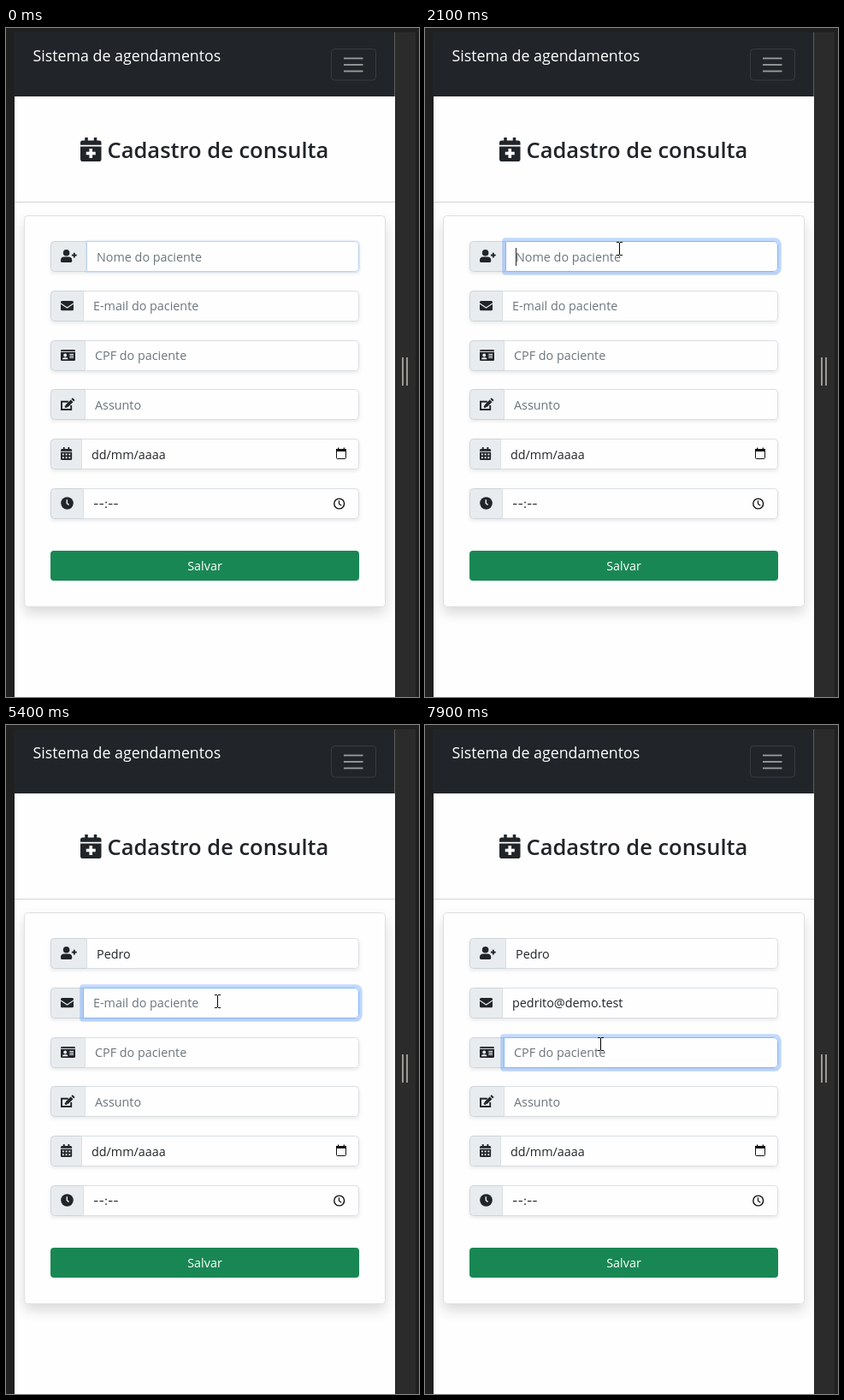
Animation, 483 px wide and 782 px high, one loop 8 s. Source, as an HTML page with a canvas:

```html
<!DOCTYPE html>
<html lang="pt-BR">
<head>
<meta charset="utf-8">
<title>Cadastro de consulta</title>
<style>
  html, body { margin: 0; width: 100%; height: 100%; overflow: hidden; background: #202020; }
  canvas { display: block; width: 483px; height: 782px; }
</style>
</head>
<body>
<canvas id="stage"></canvas>
<script>
const W = 483, H = 782, LOOP = 8000, STEP = 100;
const INK = '#212529', MUTED = '#6c757d', PAPER = '#fefefe', ADDON = '#e9ecef', DARK = '#111';
const FAMILY = '"Open Sans", "Noto Sans", sans-serif';
const FIELD_FONT = `14.35px ${FAMILY}`;
const LEFT = 52, RIGHT = 413, TOP = 249.6, PITCH = 57.75, ROW = 36;
const canvas = document.getElementById('stage');
const ctx = canvas.getContext('2d');
const dpr = window.devicePixelRatio || 1;
canvas.width = W * dpr;
canvas.height = H * dpr;

const FIELDS = [
  { icon: userIcon, split: 94, hint: 'Nome do paciente' },
  { icon: mailIcon, split: 90, hint: 'E-mail do paciente' },
  { icon: cardIcon, split: 92, hint: 'CPF do paciente' },
  { icon: editIcon, split: 92, hint: 'Assunto' },
  { icon: dateIcon, split: 88, value: 'dd/mm/aaaa' },
  { icon: timeIcon, split: 90, value: '--:--', font: '14px Inter, sans-serif' }
];
FIELDS.forEach((f, i) => {
  const y = TOP + i * PITCH;
  f.y = Math.floor(y);
  f.caret = Math.round(y + 7);
  f.base = f.caret + 16;
});

const NAME = 'Pedro', MAIL = 'pedrito@demo.test', MAIL_AT = 6000;
const KEYS = [2400, 3000, 3300, 3500, 3700];
// Each click focuses the next field.
const CLICKS = [{ at: 1080, hold: 300 }, { at: 4900, hold: 100 }, { at: 6950, hold: 100 }];
const INPUTS = [...CLICKS.map(c => c.at), ...KEYS, MAIL_AT];
const START = { x: 300, y: 688 };
const MOVES = [
  { from: 100, to: 600, x: 202, y: 224 },
  { from: 600, to: 850, x: 226, y: 259 },
  { from: 1700, to: 2100, x: 227, y: 258 },
  { from: 3900, to: 4000, x: 227, y: 253 },
  { from: 4100, to: 4700, x: 247, y: 323 },
  { from: 6200, to: 6700, x: 201, y: 384 },
  { from: 7200, to: 7500, x: 205, y: 373 }
];

const clamp = v => Math.max(0, Math.min(1, v));
const mix = (a, b, k) => a + (b - a) * k;
const easeOut = k => 1 - (1 - k) ** 3;

function box(x, y, w, h, r, fill, stroke) {
  ctx.beginPath();
  ctx.roundRect(x, y, w, h, r);
  if (fill) { ctx.fillStyle = fill; ctx.fill(); }
  if (stroke) { ctx.strokeStyle = stroke; ctx.lineWidth = 1; ctx.stroke(); }
}

function rect(x, y, w, h, fill) {
  ctx.fillStyle = fill;
  ctx.fillRect(x, y, w, h);
}

function disc(x, y, r, fill) {
  ctx.beginPath();
  ctx.arc(x, y, r, 0, Math.PI * 2);
  ctx.fillStyle = fill;
  ctx.fill();
}

function line(points, color, width) {
  ctx.beginPath();
  points.forEach(([x, y]) => ctx.lineTo(x, y));
  ctx.strokeStyle = color;
  ctx.lineWidth = width;
  ctx.stroke();
}

function text(s, x, y, font, fill, align = 'left') {
  ctx.font = font;
  ctx.fillStyle = fill;
  ctx.textAlign = align;
  ctx.fillText(s, x, y);
}

function shadow(y, blur, alpha) {
  ctx.shadowColor = `rgba(0,0,0,${alpha})`;
  ctx.shadowOffsetY = y * dpr;
  ctx.shadowBlur = blur * dpr;
}

function at(x, y, paint) {
  ctx.save();
  ctx.translate(x, y);
  paint();
  ctx.restore();
}

function cross(x, y, size, width, fill) {
  rect(x - size / 2, y - width / 2, size, width, fill);
  rect(x - width / 2, y - size / 2, width, size, fill);
}

// Icons are drawn from their top left corner, about 15 units tall.
function userIcon() {
  disc(6.6, 3.8, 3.8, INK);
  box(0, 8.5, 13.2, 6.5, [4, 4, 1.4, 1.4], INK);
  cross(15.8, 6.6, 5.8, 1.9, INK);
}

function mailIcon() {
  box(0, 2, 15, 11.2, 1.5, INK);
  line([[0, 5], [7.5, 10], [15, 5]], ADDON, 1.1);
}

function cardIcon() {
  box(0, 1, 17, 13.1, 1.4, INK);
  rect(0, 2.8, 17, 1, ADDON);
  disc(5.2, 7.5, 1.9, ADDON);
  box(1.9, 10.3, 6.5, 1.9, [1.9, 1.9, 0, 0], ADDON);
  for (let i = 0; i < 3; i++) rect(10.3, 5.9 + 1.9 * i, 4.7, 1.1, ADDON);
}

function editIcon() {
  line([[8.8, 4.7], [1, 4.7], [1, 14], [12.2, 14], [12.2, 9]], INK, 1.9);
  line([[13.1, 3.8], [7, 9.9]], INK, 3.8);
  line([[13.8, 3.1], [15.2, 1.7]], INK, 3.8);
  disc(6.2, 10.6, 1.5, INK);
}

function calendar(size) {
  const w = size * 7 / 8, r = size / 10, ring = size / 8;
  rect(ring * 1.5, 0, ring, size / 4, INK);
  rect(ring * 4.5, 0, ring, size / 4, INK);
  box(0, size / 8, w, size * 3 / 16, [r, r, 0, 0], INK);
  box(0, size * 3 / 8, w, size * 5 / 8, [0, 0, r, r], INK);
}

function dateIcon() {
  calendar(15);
  for (let i = 0; i < 6; i++) rect(1.9 + i % 3 * 3.75, 7.5 + (i > 2) * 3.75, 1.9, 1.9, ADDON);
}

function timeIcon() {
  disc(7.5, 7.5, 7.3, INK);
  line([[7.3, 3.3], [7.3, 7.7], [9.6, 9.5]], ADDON, 1.5);
}

function drawPage() {
  rect(0, 0, W, H, '#202020');
  rect(9, 5, 446, 75, INK);
  rect(454, 5, 1, 75, '#5c5c58');
  rect(455, 5, 24, H, '#2b2b2b');
  for (const x of [463, 468]) rect(x, 385, 2, 33, '#9d9893');
  rect(10, 80, 445, H, PAPER);
  text('Sistema de agendamentos', 31.5, 39, `17.8px ${FAMILY}`, '#fff');
  box(380.5, 24.5, 52, 36.5, 4, null, 'rgba(255,255,255,.1)');
  for (let i = 0; i < 3; i++) rect(395, 34.6 + 7.5 * i, 22.5, 1.8, 'rgba(255,255,255,.55)');
  at(87, 128, () => {
    calendar(28);
    cross(12.25, 18.5, 11, 3.6, PAPER);
  });
  text('Cadastro de consulta', 118.5, 152, `600 25.5px ${FAMILY}`, INK);
  rect(10, 203, 445, 1, '#d4d4d5');

  ctx.save();
  shadow(7.5, 15, .15);
  box(21.5, 219.5, 422, 457, 4, '#fff');
  ctx.restore();
  box(21.5, 219.5, 422, 457, 4, PAPER, '#dfdfdf');
  box(LEFT, 611, RIGHT - LEFT, 35, 4, '#198754');
  text('Salvar', 232.5, 633.5, FIELD_FONT, '#fff', 'center');
}

function drawField({ icon, split, y, base, hint, value, font }, typed, focus) {
  const radii = [0, 4, 4, 0], w = RIGHT - split;
  ctx.save();
  shadow(2, 4, .09);
  box(LEFT, y, RIGHT - LEFT, ROW, 4, '#fff');
  ctx.restore();
  box(LEFT + .5, y + .5, split - LEFT, ROW - 1, [4, 0, 0, 4], ADDON, '#ced4da');
  if (focus) {
    const s = 3.75 * focus;
    ctx.beginPath();
    ctx.roundRect(split - s, y - s, w + 2 * s, ROW + 2 * s, [s, 4 + s, 4 + s, s]);
    ctx.roundRect(split, y, w, ROW, radii);
    ctx.fillStyle = `rgba(13,110,253,${.25 * focus})`;
    ctx.fill('evenodd');
  }
  const border = `rgb(${mix(218, 134, focus)},${mix(223, 183, focus)},${mix(227, 254, focus)})`;
  box(split + .5, y + .5, w - 1, ROW - 1, radii, PAPER, border);
  at(64, y + 10, icon);
  const content = typed || value;
  text(content || hint, split + 12, base, font || FIELD_FONT, content ? INK : MUTED);
}

function drawPickers() {
  const [date, time] = FIELDS.slice(4);
  at(386, date.y + 11, () => {
    box(.5, 1.5, 11, 11, 1, null, DARK);
    rect(0, 1, 12, 3, DARK);
    for (const x of [2, 8.7]) rect(x, -.5, 1.3, 2, DARK);
  });
  at(389.7, time.y + 18, () => {
    disc(0, 0, 6.6, DARK);
    disc(0, 0, 5.2, PAPER);
    line([[-.2, -3.8], [-.2, .3], [2.6, 2.2]], DARK, 1.2);
  });
}

function pointerAt(t) {
  let p = START;
  for (const m of MOVES) {
    const k = easeOut(clamp((t - m.from) / (m.to - m.from)));
    p = { x: mix(p.x, m.x, k), y: mix(p.y, m.y, k) };
  }
  return { x: Math.round(p.x), y: Math.round(p.y) };
}

function drawBeam() {
  rect(0, -7, 1, 14, '#000');
  for (const y of [-8, 7]) for (const x of [-3, 1]) rect(x, y, 3, 1, '#000');
}

function drawArrow() {
  const arrow = new Path2D('M0 0v16l3.7-3.5 2.6 6 2.3-1-2.6-5.8h5z');
  ctx.fillStyle = '#fff';
  ctx.fill(arrow);
  ctx.strokeStyle = '#000';
  ctx.lineWidth = 1;
  ctx.stroke(arrow);
}

function drawPointer(t) {
  if (t < MOVES[0].from) return;
  const { x, y } = pointerAt(t);
  const inField = FIELDS.some(f => x > f.split && x < RIGHT && y >= f.y && y <= f.y + ROW);
  at(x, y, inField ? drawBeam : drawArrow);
  if (CLICKS.some(c => t >= c.at && t < c.at + c.hold)) disc(x - 2, y - 1, 15, 'rgba(255,255,0,.5)');
}

function drawCaret(t, values) {
  const active = CLICKS.filter(c => c.at <= t).length - 1;
  if (active < 0) return;
  const last = Math.max(...INPUTS.filter(i => i <= t));
  if ((t - last) % 1000 >= 500) return;
  const f = FIELDS[active];
  ctx.font = FIELD_FONT;
  const width = ctx.measureText(values[active] || '').width;
  rect(Math.round(f.split + 12 + width), f.caret, 1, 21, INK);
}

function draw(t) {
  ctx.setTransform(dpr, 0, 0, dpr, 0, 0);
  const ramp = start => clamp((t - start) / 150);
  const focus = CLICKS.map((c, i) => ramp(c.at) - ramp(CLICKS[i + 1]?.at ?? LOOP));
  focus[0] += 1 - ramp(-100);
  const values = [NAME.slice(0, KEYS.filter(k => k <= t).length), t >= MAIL_AT ? MAIL : ''];
  drawPage();
  FIELDS.forEach((f, i) => drawField(f, values[i], focus[i] || 0));
  drawPickers();
  drawCaret(t, values);
  drawPointer(t);
}

function tick() {
  const t = performance.now() % LOOP;
  draw(Math.floor(t / STEP) * STEP);
  requestAnimationFrame(tick);
}
tick();
</script>
</body>
</html>
```
